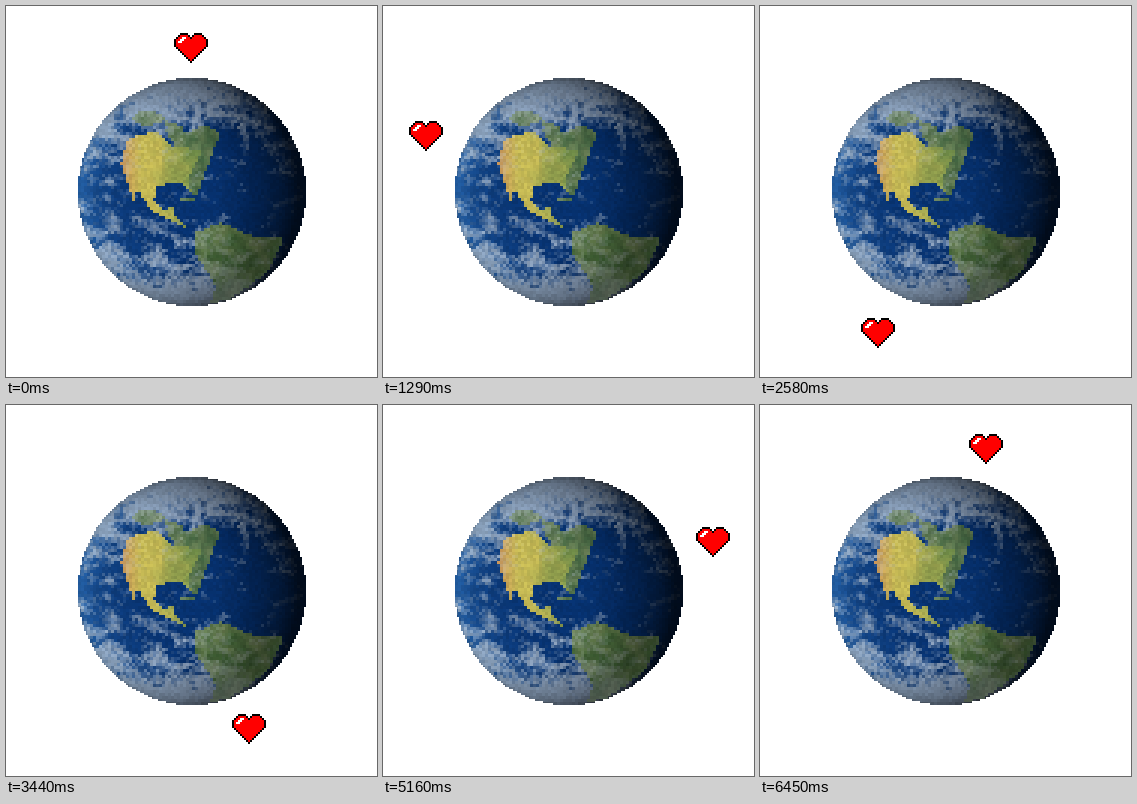
Animation of 371x371 px, one loop 6.88 s. Source, as an HTML page with a canvas:

```html
<!DOCTYPE html>
<html lang="en">
<head>
<meta charset="utf-8">
<title>Heart around the Earth</title>
<style>
html, body { margin: 0; width: 100%; height: 100%; overflow: hidden; background: #fff; }
canvas { position: absolute; left: 0; top: 0; }
</style>
</head>
<body>
<canvas id="earth" width="371" height="371"></canvas>
<canvas id="heart" width="34" height="30"></canvas>
<script>
const earth = document.getElementById('earth');
const heart = document.getElementById('heart');
const ctx = earth.getContext('2d');

const CELL = 3, CENTER = 186, RADIUS = 114;
const clamp = (v, lo = 0, hi = 1) => Math.max(lo, Math.min(hi, v));
const mix = (a, b, t) => a.map((v, i) => v + (b[i] - v) * t);

// Repeatable randomness and smooth value noise
const rand = (x, y) => {
  const s = Math.sin(x * 127.1 + y * 311.7) * 43758.5453;
  return s - Math.floor(s);
};
function noise(x, y) {
  const i = Math.floor(x), j = Math.floor(y);
  const u = x - i, v = y - j;
  const top = rand(i, j) * (1 - u) + rand(i + 1, j) * u;
  const low = rand(i, j + 1) * (1 - u) + rand(i + 1, j + 1) * u;
  return top * (1 - v) + low * v;
}

const north = new Path2D('M122 132L150 125 164 140 196 144 181 174 186 187 177 177 152 179 148 194 156 204 170 201 167 209 181 223 147 206 131 183 128 198 115 158Z');
const south = new Path2D('M190 226L215 217 249 231 278 231 262 266 226 292 204 298 210 280 188 245Z');
const patches = new Path2D();
for (const [x, y, rx, ry] of [[142, 112, 15, 7], [169, 125, 9, 7], [198, 130, 15, 9], [181, 194, 8, 2]])
  patches.ellipse(x, y, rx, ry, 0, 0, 7);

function landAt(x, y) {
  const inside = path => ctx.isPointInPath(path, x, y);
  const patch = noise(x / 7, y / 7);
  if (inside(south)) return mix([62, 100, 52], [112, 132, 84], patch);
  if (inside(north)) {
    const west = mix([204, 150, 90], [196, 184, 84], clamp((x - 115) / 20));
    return mix(west, [112, 140, 72], clamp((x - 150) / 45 + patch * .5 - .2));
  }
  if (inside(patches)) return mix([62, 96, 62], [115, 135, 90], patch);
}

// Streaky clouds, thickest toward both poles and the western limb
function cloudAt(x, y, u, v) {
  const cover = .12 + (v * v + .3 * u * u) * clamp(1.1 - u);
  const warp = noise(x / 25, y / 25) * 3;
  const streak = noise(x / 13 + warp, y / 6 + warp) * .7 + rand(x, y) * .3;
  const band = Math.abs(Math.hypot(x - 207, y - 138) - 32) < 3 && x + y > 350;
  return clamp((streak + cover - .78) * 1.7 + (band ? .4 : 0), 0, .7);
}

function clipToDisc() {
  const disc = new Path2D();
  for (let y = -RADIUS; y < RADIUS; y += 2) {
    const half = 2 * Math.round(Math.sqrt(RADIUS ** 2 - (y + 1) ** 2) / 2);
    disc.rect(CENTER - half, CENTER + y, 2 * half, 2);
  }
  ctx.clip(disc);
}

function drawEarth() {
  clipToDisc();
  const first = CENTER - RADIUS, last = CENTER + RADIUS;
  for (let y = first; y < last; y += CELL) for (let x = first; x < last; x += CELL) {
    const u = (x + CELL / 2 - CENTER) / RADIUS, v = (y + CELL / 2 - CENTER) / RADIUS;
    const z = Math.sqrt(Math.max(0, 1 - u * u - v * v));
    const land = landAt(x + CELL / 2, y + CELL / 2);
    const sea = mix([4, 46, 108], [34, 92, 160], clamp(-u * (1 - z) * 1.3 + .08));
    const shade = clamp(.42 + .8 * (.83 * z - .55 * u), land ? .6 : .25);
    const cloud = cloudAt(x, y, u, v) * (land ? .6 : 1);
    const color = mix(land || sea, [190, 201, 212], cloud)
      .map(c => Math.round(c * shade * (.93 + rand(y, x) * .14)));
    ctx.fillStyle = `rgb(${color})`;
    ctx.fillRect(x, y, CELL, CELL);
  }
}

function drawHeart() {
  const pen = heart.getContext('2d');
  const bar = (color, x, y, width) => {
    pen.fillStyle = color;
    pen.fillRect(x * 2, y * 2, width * 2, 2);
  };
  // A black span with a red core, one cell in from each end
  const span = (x, y, width, solid) => {
    bar('#000', x, y, width);
    if (!solid) bar('#f00', x + 1, y, width - 2);
  };
  for (let y = 0; y < 3; y++)
    for (const x of [3 - y, 10 - y]) span(x, y, 4 + 2 * y, y === 0);
  for (let y = 3; y < 15; y++) {
    const inset = Math.max(0, y - 6);
    span(inset, y, 17 - 2 * inset, y === 14);
  }
  for (let i = 0; i < 3; i++) bar('#fff', 4 - i, 2 + i, 2);
}

const STEP = 430;
const orbit = [
  [168, 27], [100, 43], [49, 81], [26, 115], [17, 171], [28, 260], [101, 312], [168, 315],
  [226, 309], [284, 270], [308, 221], [317, 171], [313, 122], [292, 82], [241, 43], [209, 29]
];

function frame() {
  const [x, y] = orbit[Math.floor(performance.now() / STEP) % orbit.length];
  heart.style.transform = `translate(${x}px, ${y}px)`;
  requestAnimationFrame(frame);
}

drawEarth();
drawHeart();
frame();
</script>
</body>
</html>
```
